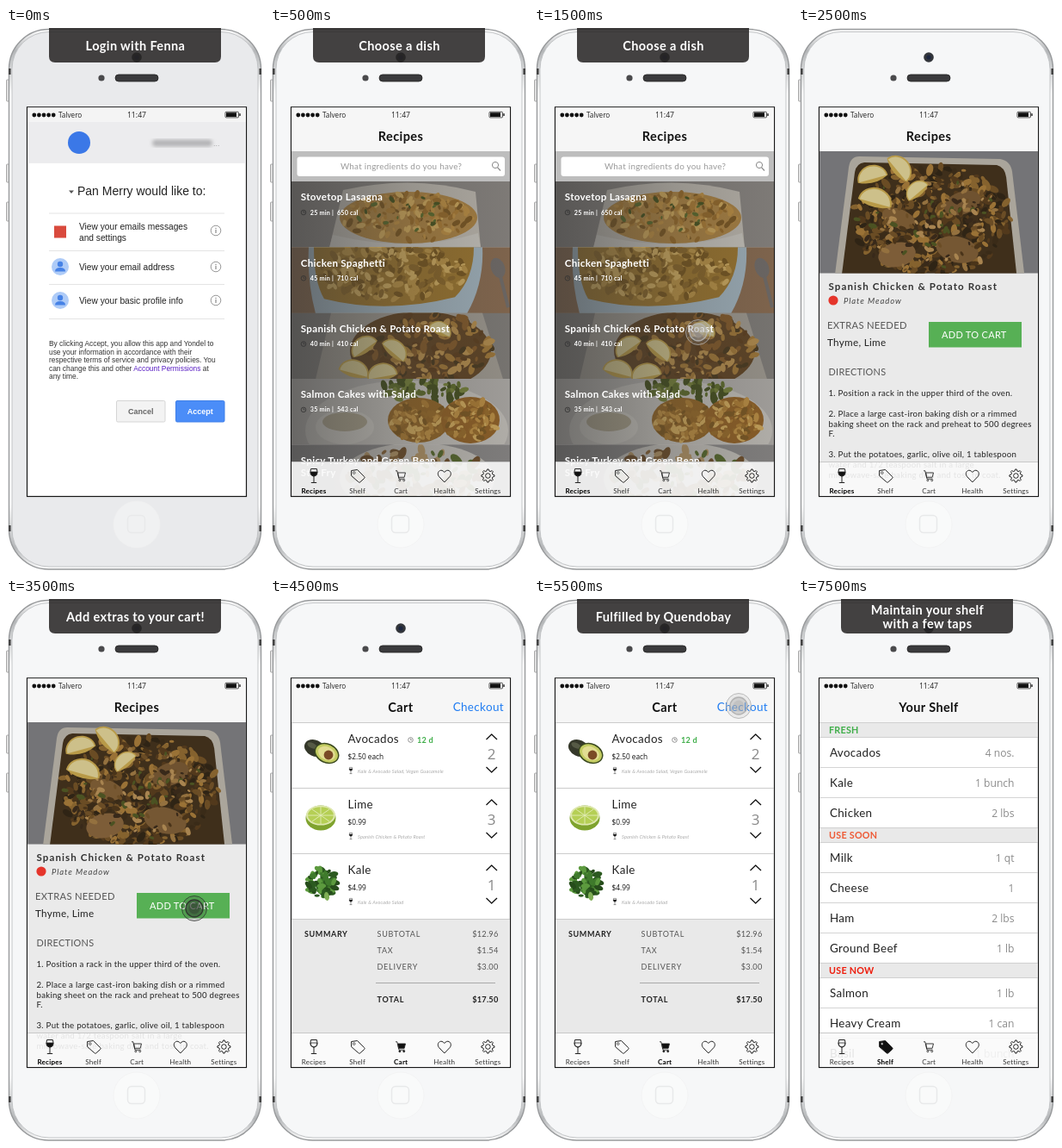
These frames come from a looping animation (300 by 630 pixels, 8 s). An HTML page:

```html
<!DOCTYPE html>
<html lang="en">
<head>
<meta charset="utf-8">
<title>Recipe app tour</title>
<style>
html, body { margin: 0; width: 100%; height: 100%; overflow: hidden; background: #fff; }
svg { display: block; }
text { font-family: Lato, sans-serif; white-space: pre; }
.sys { font-family: "Open Sans", sans-serif; }
.web { font-family: "Liberation Sans", Arial, sans-serif; }
.b { font-weight: 700; }
.i { font-style: italic; }
</style>
</head>
<body>
<svg id="stage" width="300" height="630" viewBox="0 0 300 630"></svg>
<script>
const LOOP = 8000;
const MID = 'text-anchor="middle"', END = 'text-anchor="end"';

// drawing helpers; the app face is set a little smaller and looser
function text(x, y, s, size, fill = '#222', cls = '', more = '') {
  const app = !/sys|web/.test(cls);
  return `<text x="${x}" y="${y}" font-size="${app ? size * .95 : size}" fill="${fill}" class="${cls}" ` +
    `${more} letter-spacing="${app ? '.026em' : 0}">${s}</text>`;
}
const rect = (x, y, w, h, fill, more = '') =>
  `<rect x="${x}" y="${y}" width="${w}" height="${h}" fill="${fill}" ${more}/>`;
const disc = (x, y, r, fill, more = '') =>
  `<circle cx="${x}" cy="${y}" r="${r}" fill="${fill}" ${more}/>`;
const oval = (x, y, rx, ry, fill, turn = 0) =>
  `<ellipse cx="${x}" cy="${y}" rx="${rx}" ry="${ry}" fill="${fill}" transform="rotate(${turn} ${x} ${y})"/>`;
const shape = (d, fill, more = '') => `<path d="${d}" fill="${fill}" ${more}/>`;
const line = (d, color = '#222', width = 1) =>
  shape(d, 'none', `stroke="${color}" stroke-width="${width}" stroke-linejoin="round"`);
const rule = (x1, x2, y, color = '#ccc') => line(`M${x1} ${y}H${x2}`, color);
const view = (x, y, w, h, body) =>
  `<svg x="${x}" y="${y}" width="${w}" height="${h}">${body}</svg>`;

// random crumbs of food inside an ellipse
function crumbs(seed, n, x, y, rx, ry, size, colors) {
  const rnd = () => (seed = seed * 16807 % 2147483647) / 2147483647;
  let out = '';
  for (let i = 0; i < n; i++) {
    const a = rnd() * 6.283, d = Math.sqrt(rnd()), r = size * (.5 + rnd());
    out += oval((x + Math.cos(a) * d * rx).toFixed(1), (y + Math.sin(a) * d * ry).toFixed(1),
      r.toFixed(1), (r * .55).toFixed(1), colors[i % colors.length], Math.round(rnd() * 180));
  }
  return out;
}

const lemon = (x, y, r, turn) =>
  `<g transform="translate(${x} ${y}) rotate(${turn})">` +
  shape(`M${-r} 0A${r} ${r * .9} 0 0 1 ${r} 0Q0 ${r * .5} ${-r} 0`, '#b89a48') +
  shape(`M${-r * .9} 0A${r * .9} ${r * .8} 0 0 1 ${r * .9} 0Z`, '#cdc08a') + '</g>';

const clock = (x, y, c) =>
  disc(x, y, 2.8, 'none', `stroke="${c}" stroke-width=".8"`) + line(`M${x} ${y - 1.8}V${y}H${x + 1.6}`, c, .7);

const tap = (x, y, c) =>
  disc(x, y, 14.5, c, `fill-opacity=".15" stroke="${c}" stroke-opacity=".75"`) +
  disc(x, y, 10, c, `fill-opacity=".4" stroke="${c}" stroke-opacity=".85" stroke-width="1.4"`) +
  disc(x, y, 6.5, c, 'fill-opacity=".35"');

function phone(body) {
  let out = rect(0, 0, 300, 630, '#fff');
  for (const [y, h] of [[60, 25], [158, 21], [202, 22]])
    out += rect(.5, y, 4, h, '#e4e4e4', 'stroke="#999" stroke-width=".8" rx="1"');
  out += rect(3.5, 1.5, 293, 626.5, 'url(#metal)', 'rx="46" stroke="#97999b" stroke-width="1.4"') +
    rect(7, 4.5, 286, 620.5, body, 'rx="43" stroke="#bfc1c3" stroke-width=".9"');
  for (const y of [47, 577]) out += rect(3, y, 2.6, 7, '#444') + rect(294.4, y, 2.6, 7, '#444');
  return out +
    disc(152, 34, 5.8, '#33363b') + disc(152, 34, 2.6, '#1d2740') +
    disc(111, 58, 3.6, '#4a4a4c') +
    rect(127, 54, 50, 8, '#3b3b3d', 'rx="4" stroke="#222" stroke-width=".8"') +
    disc(152, 576, 27, '#fff', 'fill-opacity=".3" stroke="#f0f0f0" stroke-width=".6"') +
    rect(141.5, 565.5, 20, 20, 'none', 'rx="4.5" stroke="#e8e9ea" stroke-width="1.5"') +
    rect(24.5, 91.8, 255, 451.7, '#fff', 'stroke="#161616" stroke-width="1.2"');
}

function status() {
  let out = '';
  for (let i = 0; i < 5; i++) out += disc(32.8 + i * 5.6, 101, 2.4, '#111');
  return out + text(61, 104, 'Talvero', 8.2, '#222', 'sys') +
    text(152, 104, '11:47', 8.7, '#222', 'sys', MID) +
    rect(255, 97.3, 15.5, 6.6, '#fff', 'rx="1" stroke="#222" stroke-width=".8"') +
    rect(256, 98.2, 12, 4.8, '#111') + rect(271.3, 99.2, 1.4, 2.8, '#222');
}

const header = title => rect(25.1, 92.4, 253.8, 51, '#f6f6f6') + status() +
  text(152, 130.8, title, 15.3, '#111', 'b', MID);

const glass = (x, y, k, full) => `<g transform="translate(${x} ${y}) scale(${k})">` +
  shape('M-3.4 -8H3.4Q5.6 0 0 .5Q-5.6 0 -3.4 -8Z', 'none', 'stroke="#222"') +
  shape('M-4 -4.5H4Q4 0 0 .5Q-4 0 -4 -4.5Z', full ? '#111' : 'none', 'stroke="#222" stroke-width=".8"') +
  line('M0 0V8M-3.2 8H3.2') + '</g>';

function gear() {
  let d = '';
  for (let i = 0; i < 32; i++) {
    const a = (i - .5) * Math.PI / 16, r = i % 4 < 2 ? 7.6 : 5.6;
    d += (i ? 'L' : 'M') + (r * Math.cos(a)).toFixed(2) + ' ' + (r * Math.sin(a)).toFixed(2);
  }
  return line(d + 'Z') + disc(0, 0, 2.8, 'none', 'stroke="#222"');
}

function tabs(active) {
  const fill = i => i === active ? '#111' : 'none';
  const icons = [
    glass(0, 0, 1, active === 0),
    shape('M-7 -6L0 -7L8 1Q9 2 8 3L3 7.5Q2 8 1 7L-7 0Z', fill(1), 'stroke="#222"') +
      disc(-3.8, -3.4, 1.3, '#fff', 'stroke="#222" stroke-width=".7"'),
    '<g transform="scale(.88)">' + shape('M-4 -4H6L4.5 2H-3Z', fill(2), 'stroke="#222"') +
      line('M-7 -6.5H-5L-2.5 4.2H5') +
      disc(-1.5, 6, 1.2, fill(2), 'stroke="#222" stroke-width=".8"') +
      disc(4, 6, 1.2, fill(2), 'stroke="#222" stroke-width=".8"') + '</g>',
    line('M0 7.5L-6.4 .8C-10 -4 -4 -9.5 0 -4C4 -9.5 10 -4 6.4 .8Z'),
    gear()
  ];
  return rect(25.1, 503.5, 253.8, 39.4, '#fafafa', 'fill-opacity=".9"') + rule(25.1, 278.9, 503.5, '#c8c8c8') +
    ['Recipes', 'Shelf', 'Cart', 'Health', 'Settings'].map((name, i) => {
      const x = 51 + i * 50.6;
      return `<g transform="translate(${x} 519.5)">${icons[i]}</g>` +
        text(x, 540, name, 8.5, i === active ? '#000' : '#333', i === active ? 'b' : '', MID);
    }).join('');
}

function banner(...lines) {
  const y = lines.length > 1 ? 18.4 : 25.7;
  return shape('M50 0H250V33Q250 40 243 40H57Q50 40 50 33Z', '#262424', 'fill-opacity=".86"') +
    lines.map((s, i) => text(150.5, y + i * 16, s, 15.3, '#fff', 'b', MID)).join('');
}

function login() {
  const row = (y, ...lines) => lines.map((s, i) => text(85, y + i * 13, s, 10.2, '#222', 'web')).join('');
  const info = y => disc(244, y, 5.8, 'none', 'stroke="#999"') +
    rect(243.3, y - 1, 1.4, 4, '#999') + rect(243.3, y - 3.2, 1.4, 1.4, '#999');
  const user = y => disc(63, y, 10, '#aecbf7') + disc(63, y - 3, 3.2, '#4682e6') +
    shape(`M57 ${y + 5.5}Q57 ${y + 1} 63 ${y + 1}T69 ${y + 5.5}Z`, '#4682e6');
  const button = (x, s, fill, edge, ink) =>
    rect(x, 432.5, 56.5, 24.5, fill, `rx="1.5" stroke="${edge}"`) + text(x + 28.3, 448, s, 9, ink, 'web b', MID);
  const terms = ['By clicking Accept, you allow this app and Yondel to',
    'use your information in accordance with their',
    'respective terms of service and privacy policies. You',
    'can change this and other <tspan fill="#5a1fc4">Account Permissions</tspan> at', 'any time.'];
  return rect(25.1, 92.4, 253.8, 16.5, '#f4f4f4') + rect(25.1, 108.9, 253.8, 48, '#ececee') + status() +
    disc(85, 133, 13, '#3b78e7') +
    '<g filter="url(#soft)">' + rect(170, 129.5, 70, 8, '#b4b4b6', 'rx="4"') + '</g>' +
    text(241, 137, '...', 9, '#aaa', 'web') +
    shape('M73 188.5H79L76 192Z', '#555') +
    text(83, 194, 'Pan Merry would like to:', 14, '#222', 'web') +
    [215, 258.5, 297.5, 337.5].map(y => rule(50, 254, y, '#e4e4e4')).join('') +
    row(234, 'View your emails messages', 'and settings') + row(281, 'View your email address') +
    row(320, 'View your basic profile info') +
    rect(56, 229.5, 14, 14, '#d94a3d') + user(277) + user(316) + [235, 277, 316].map(info).join('') +
    terms.map((s, i) => text(50, 369 + i * 9.5, s, 8.4, '#333', 'web')).join('') +
    button(128.5, 'Cancel', '#f3f3f3', '#d5d5d5', '#666') + button(197.5, 'Accept', '#4b8df8', '#3f7fe8', '#fff');
}

function recipes() {
  const gold = ['#b98c42', '#94692a', '#cba55a', '#7a5722', '#a87a34'];
  const roast = ['#80592b', '#5c3f20', '#9c7538', '#4a3a20', '#b08a4c'];
  const photos = [
    rect(0, 0, 254, 77, '#86827e') +
      shape('M60 10Q140 -8 214 12L220 77H44Z', '#b9b4ab') + oval(136, 42, 80, 30, '#a98142') +
      crumbs(7, 170, 136, 42, 77, 28, 4, gold) + crumbs(9, 18, 136, 38, 62, 20, 3, ['#5b6a2c', '#48531f']) +
      shape('M44 77L48 62Q140 84 217 60L220 77Z', '#c4c1ba'),
    rect(0, 0, 254, 77, '#86694f') + shape('M20 0H222Q224 42 204 77H28Q18 40 20 0Z', '#9fb0ba') +
      shape('M26 0H212Q212 36 190 58Q110 78 38 60Q26 40 26 0Z', '#99742f') +
      crumbs(11, 240, 120, 28, 88, 32, 4.5, ['#b58f45', '#87652a', '#cba85e', '#765620']) +
      oval(240, 24, 8, 12, '#6f6a67', -20) + line('M243 34L252 70', '#6f6a67', 4),
    rect(0, 0, 254, 77, '#7d7a76') + shape('M46 0H222L246 77H28Z', '#9b968d') + oval(150, 44, 82, 46, '#5f4425') +
      crumbs(19, 170, 160, 42, 74, 42, 5, roast) +
      lemon(86, 42, 17, -35) + lemon(118, 46, 17, 40) + lemon(72, 70, 18, 15) + lemon(106, 74, 18, -10) + lemon(172, 22, 14, 25),
    rect(0, 0, 254, 77, '#aaa7a3') + oval(134, 60, 118, 58, '#bdbab4') +
      crumbs(23, 60, 152, 14, 50, 14, 5, ['#5d6a2c', '#747f3a', '#454f20']) +
      oval(148, 48, 36, 26, '#8f6428') + crumbs(29, 90, 148, 48, 33, 23, 4, gold) +
      oval(208, 48, 34, 27, '#8f6026') + crumbs(31, 90, 208, 48, 31, 24, 4, gold) +
      oval(62, 56, 34, 20, '#c9c6bf') + oval(62, 50, 26, 11, '#a8a08a'),
    rect(0, 0, 254, 77, '#868483') + oval(146, 40, 90, 42, '#bcb9b3') +
      crumbs(37, 130, 146, 38, 80, 34, 6, ['#6c4d2a', '#55662c', '#846237', '#ad9063'])
  ];
  const dishes = [['Stovetop Lasagna', 25, 650], ['Chicken Spaghetti', 45, 710],
    ['Spanish Chicken &amp; Potato Roast', 40, 410], ['Salmon Cakes with Salad', 35, 543],
    ['Spicy Turkey and Green Bean']];
  const cards = dishes.map(([name, min, cal], i) => view(25, 178 + i * 76.3, 254, 76.8,
    photos[i] + rect(0, 0, 254, 77, 'url(#shade)') + text(10.8, 22.4, name, 12.2, '#fff', 'b') +
    (min ? clock(14, 36, '#333') + text(21.8, 38.6, `${min} min |  ${cal} cal`, 7.6, '#fff', 'b')
      : text(10.8, 37, 'Stir-Fry', 12.2, '#fff', 'b')))).join('');
  return header('Recipes') + view(25.1, 92, 253.8, 451,
      `<g transform="translate(-25.1 -92)">${rect(25, 143, 254, 36, '#bdbdbd')}${cards}</g>`) +
    rect(31.5, 149.5, 241.5, 22.5, '#fff', 'rx="3"') +
    text(152.5, 164, 'What ingredients do you have?', 10.4, '#999', '', MID) +
    disc(262, 159, 3.6, 'none', 'stroke="#888"') + line('M264.6 161.8L268 165.5', '#888', 1.2) + tabs(0);
}

function recipe() {
  const photo = rect(0, 0, 254, 142, '#747477') +
    shape('M46 6L210 9Q222 11 224 24L238 142H18L34 18Q36 6 46 6Z', '#aaa59b') +
    shape('M52 13L206 16Q215 18 217 30L229 142H26L41 24Q43 14 52 13Z', '#3f2f1b') +
    crumbs(5, 420, 130, 80, 92, 64, 5, ['#6a4c24', '#85622e', '#3a2b18', '#9a7236', '#52391c', '#2f2415']) +
    oval(92, 78, 20, 11, '#775832', 20) + oval(90, 120, 22, 14, '#7d5d38', -12) +
    oval(166, 60, 22, 13, '#6f5230', -20) + oval(160, 114, 25, 15, '#755733', 14) +
    crumbs(43, 170, 130, 84, 88, 58, 3.5, ['#94713f', '#4a3419', '#6b4d26', '#a88450', '#38291a', '#4b5222']) +
    lemon(62, 32, 18, -15) + lemon(64, 60, 20, 15) + lemon(90, 22, 18, 50) + lemon(115, 48, 15, -40);
  const steps = [[427, '1. Position a rack in the upper third of the oven.'],
    [451, '2. Place a large cast-iron baking dish or a rimmed'],
    [462.5, 'baking sheet on the rack and preheat to 500 degrees'], [474, 'F.'],
    [498, '3. Put the potatoes, garlic, olive oil, 1 tablespoon'],
    [510, 'water and 1/2 teaspoon salt in a large'], [522, 'microwave-safe baking dish and toss to coat.']];
  return header('Recipes') + rect(25.1, 284, 253.8, 259, '#eaeaea') + view(25.1, 143, 253.8, 141.5, photo) +
    text(35.5, 304, 'Spanish Chicken &amp; Potato Roast', 12.2, '#333', 'b', 'letter-spacing="1.08"') +
    disc(41, 316, 5.6, '#e5352b') + text(53, 319.5, 'Plate Meadow', 10, '#444', 'i', 'letter-spacing=".95"') +
    text(34, 349, 'EXTRAS NEEDED', 11.8, '#555') + text(34, 368.5, 'Thyme, Lime', 12.3) +
    rect(152, 341, 108, 29.5, '#57b055') + text(167, 360, 'ADD TO CART', 11.6, '#fff') +
    text(35.5, 403, 'DIRECTIONS', 11.5, '#555') +
    steps.map(([y, s]) => text(35.5, y, s, 10.2)).join('') + tabs(0);
}

function cart() {
  const pictures = [
    oval(52, 173, 12.5, 9.5, '#35382a', 25) + oval(49, 170, 6, 3, '#565a45', 25) +
      oval(66, 179, 15, 11.5, '#3c4a20', 25) + oval(66, 179, 13.5, 10, '#c3cc62', 25) +
      oval(66, 179, 10.5, 7.5, '#e2dd92', 25) + disc(68, 181, 5.4, '#7a4a26'),
    oval(59, 254, 17.5, 14.5, '#7fa32e') + oval(59, 251, 17, 11.5, '#dfe8b0') + oval(59, 251, 15, 9.8, '#b5cf55') +
      line('M44 251H74M49 244L69 258M69 244L49 258M59 241V261', '#e3edb8', .9),
    crumbs(17, 90, 60, 329, 17, 16, 4, ['#3f7a2c', '#2c5a20', '#5c9a3e', '#264c1b']) + oval(66, 345, 3, 5, '#7fae55', -10)
  ];
  const items = [['Avocados', '$2.50 each', 2, 'Kale &amp; Avocado Salad, Vegan Guacamole'],
    ['Lime', '$0.99', 3, 'Spanish Chicken &amp; Potato Roast'], ['Kale', '$4.99', 1, 'Kale &amp; Avocado Salad']];
  const rows = items.map(([name, price, count, use], i) => {
    const y = i * 76;
    return pictures[i] + text(90.5, 167 + y, name, 14.1) + text(90.5, 186 + y, price, 8.3, '#111', 'sys') +
      glass(94, 199 + y, .45, true) + text(102, 201.5 + y, use, 5.9, '#aaa', 'i') +
      line(`M251.5 ${163 + y}L257.7 ${157 + y}L264 ${163 + y}M251.5 ${195 + y}L257.7 ${201 + y}L264 ${195 + y}`, '#111', 1.3) +
      text(257.7, 185.5 + y, count, 17, '#888', 'sys', MID) + rule(25.1, 278.9, 219.5 + y);
  }).join('');
  const sum = (y, name, cost, cls = '') =>
    text(124.5, y, name, 9.5, cls ? '#222' : '#555', cls, 'letter-spacing=".75"') +
    text(265.5, y, cost, 9.7, cls ? '#222' : '#555', cls, END);
  return header('Cart') + rule(25.1, 278.9, 143.5) + text(272, 130, 'Checkout', 14.2, '#1f7cf2', '', END) +
    rows + clock(163.5, 163.5, '#777') + text(171, 166.5, '12 d', 9.6, '#3fae49', 'b') +
    rect(25.1, 371.5, 253.8, 132, '#e9e9e9') + rule(25.1, 278.9, 371.5) +
    text(40, 391.5, 'SUMMARY', 9.5, '#222', 'b', 'letter-spacing=".6"') +
    sum(391.5, 'SUBTOTAL', '$12.96') + sum(411, 'TAX', '$1.54') + sum(430, 'DELIVERY', '$3.00') +
    rule(123, 262, 445.5, '#aaa') + sum(468, 'TOTAL', '$17.50', 'b') + tabs(2);
}

function shelf() {
  const groups = [
    ['FRESH', '#3fae49', [['Avocados', '4 nos.'], ['Kale', '1 bunch'], ['Chicken', '2 lbs']]],
    ['USE SOON', '#ee5a36', [['Milk', '1 qt'], ['Cheese', '1'], ['Ham', '2 lbs'], ['Ground Beef', '1 lb']]],
    ['USE NOW', '#ee1c0c', [['Salmon', '1 lb'], ['Heavy Cream', '1 can'], ['Basil', '1 bunch']]]
  ];
  let out = header('Your Shelf'), y = 143;
  for (const [name, color, rows] of groups) {
    out += rect(25.1, y, 253.8, 17.5, '#e9e9e9') + rule(25.1, 278.9, y + .5, '#d0d0d0') +
      rule(25.1, 278.9, y + 17.5, '#d0d0d0') + text(36, y + 13.2, name, 11.3, color, 'b');
    y += 17.5;
    for (const [food, amount] of rows) {
      out += text(37, y + 22.5, food, 14.1) + text(251.5, y + 22.5, amount, 12.1, '#8c8c8c', 'sys', END);
      y += 34.85;
      if (y < 540) out += rule(25.1, 278.9, Math.round(y) + .5, '#d4d4d4');
    }
  }
  return out + tabs(1);
}

const stop = (at, color, alpha = 1) => `<stop offset="${at}" stop-color="${color}" stop-opacity="${alpha}"/>`;
const defs = '<defs><linearGradient id="shade">' +
  stop(0, '#333', .55) + stop(.55, '#333', .25) + stop(1, '#333', .1) +
  '</linearGradient><linearGradient id="metal" x2="0" y2="1">' +
  stop(0, '#fff') + stop(.04, '#b4b6b8') + stop(.12, '#fff') + stop(.88, '#fff') + stop(.96, '#b4b6b8') + stop(1, '#fff') +
  '</linearGradient><filter id="soft"><feGaussianBlur stdDeviation="2"/></filter></defs>';
const light = phone('#f6f7f8');
const scenes = [
  [0, phone('#e9eaec') + login() + banner('Login with Fenna')],
  [500, light + recipes() + banner('Choose a dish')],
  [1500, light + recipes() + tap(191, 353, '#b5b5b5') + banner('Choose a dish')],
  [2500, light + recipe()],
  [3500, light + recipe() + tap(219, 359, '#2c2c2c') + banner('Add extras to your cart!')],
  [4500, light + cart()],
  [5500, light + cart() + tap(238, 124, '#aaa') + banner('Fulfilled by Quendobay')],
  [7500, light + shelf() + banner('Maintain your shelf', 'with a few taps')]
];

const stage = document.getElementById('stage');
let shown = null;
function draw() {
  const t = performance.now() % LOOP;
  const scene = scenes.filter(([start]) => start <= t).pop();
  if (scene !== shown) stage.innerHTML = defs + scene[1];
  shown = scene;
  requestAnimationFrame(draw);
}
draw();
</script>
</body>
</html>
```
